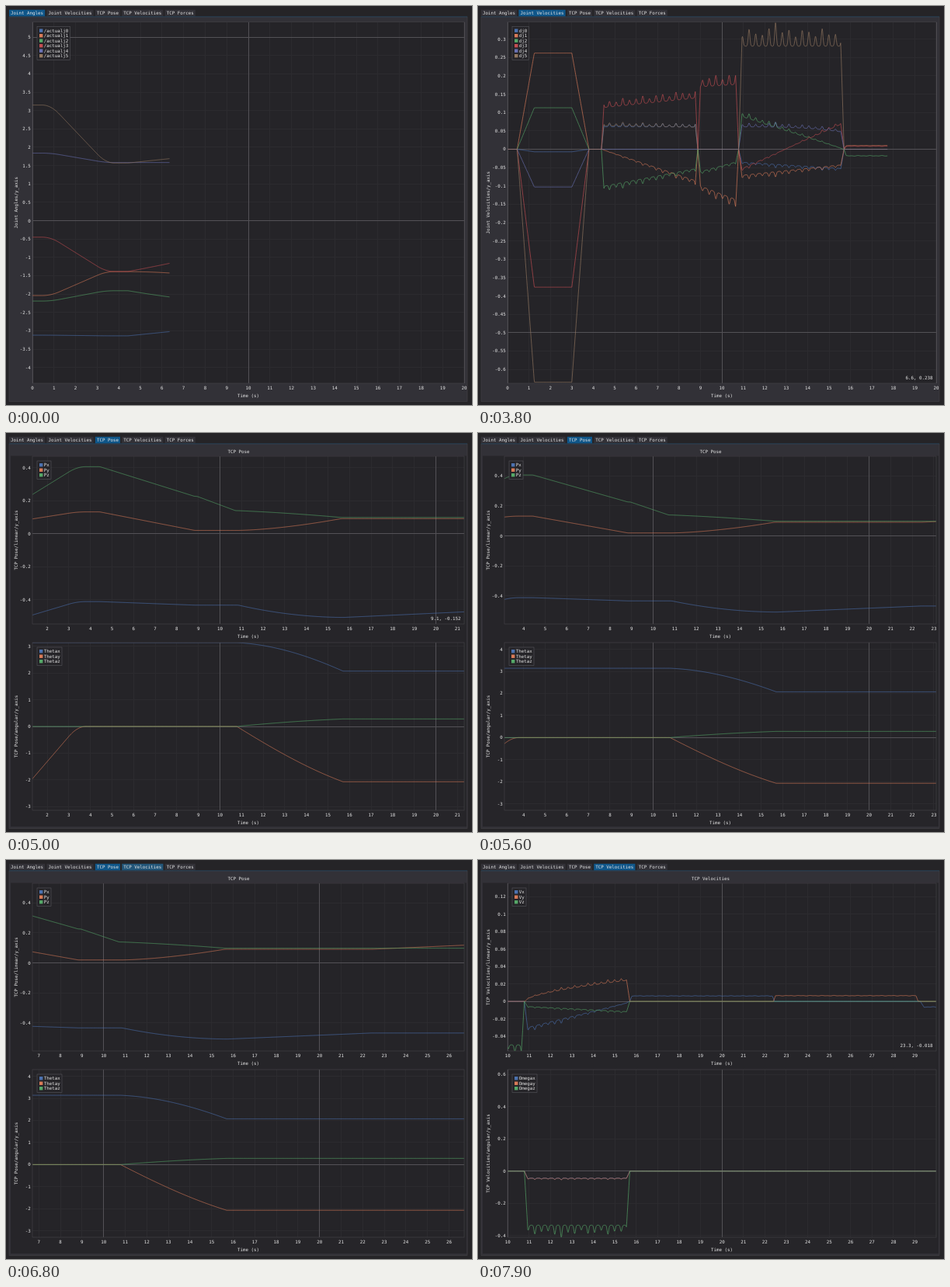
An HTML page for the animation above (8000 ms loop, 600 px wide and 514 px high).

```html
<!DOCTYPE html>
<html lang="en">
<head>
<meta charset="utf-8">
<title>Robot telemetry</title>
<style>
  html, body { margin: 0; width: 100%; height: 100%; overflow: hidden; background: #252427; }
  svg { display: block; }
  text { font: 5.82px "DejaVu Sans Mono", monospace; fill: #e6e6e6; dominant-baseline: central; white-space: pre; }
  .mid { text-anchor: middle; }
  .end { text-anchor: end; }
  .grid { stroke: #2c2b2f; shape-rendering: crispEdges; }
  .major { stroke: #535156; }
  .line { fill: none; stroke-width: .65; stroke-linejoin: round; }
</style>
</head>
<body>
<svg id="stage" width="600" height="514" viewBox="0 0 600 514"></svg>
<script>
const LOOP = 8000, STEP = 100, SPAN = 20, RIGHT = 590, CHAR = 3.5, DT = 0.02, END = 31;
const COLORS = ['#4c72b0', '#d97b58', '#55a868', '#c44e52', '#6a72b3', '#937860'];
const TABS = ['Joint Angles', 'Joint Velocities', 'TCP Pose', 'TCP Velocities', 'TCP Forces'];
const stage = document.getElementById('stage');

const clamp = v => Math.min(1, Math.max(0, v));
const mix = (a, b, k) => a + (b - a) * k;

// The robot's moves: start, end and ramp time in seconds
const MOVES = [[.45, 3.8, .8], [4.38, 8.88, .11], [8.88, 10.78, .12], [10.78, 15.7, .15],
  [15.7, 22.45, .1], [22.4, 29.15, .1], [29.25, 40, .17]];
const SWING = MOVES[3];
const ramp = (s, [from, to, rise]) => clamp(Math.min(s - from, to - s) / rise);
const progress = (s, [from, to]) => clamp((s - from) / (to - from));

// Periodic load peaks at steady speed
function ripple(s) {
  const i = MOVES.findIndex(m => ramp(s, m) === 1);
  if (i < 1) return 0;
  if (i > 3) return 0.05 * Math.sin(s * 17) * Math.sin(s * 5.3);
  const k = Math.floor(s / 0.31), f = s / 0.31 - k;
  const jolt = Math.exp(-(((s - 12.5) / 0.05) ** 2));
  return (0.13 + 0.04 * Math.sin(k * 2.3)) * Math.exp(-(((f - 0.35) / 0.17) ** 2)) + 0.13 * jolt;
}

// One axis: a speed, or [first, last, bend], per move; the place is its integral
function axis(start, ...speeds) {
  const smooth = s => speeds.reduce((sum, v, i) => {
    const [a, b = a, bend = 1] = [v].flat();
    return sum + mix(a, b, progress(s, MOVES[i]) ** bend) * ramp(s, MOVES[i]);
  }, 0);
  const sums = [start];
  for (let n = 1; n * DT <= END; n++) sums[n] = sums[n - 1] + 0.975 * DT * smooth((n - 0.5) * DT);
  const place = s => {
    const n = Math.floor(s / DT);
    return mix(sums[n], sums[n + 1], s / DT - n);
  };
  return { place, speed: s => smooth(s) * (1 + ripple(s)) };
}

const joints = [
  axis(-3.12, -.007, .061, 0, [-.035, -.053]),
  axis(-2.04, .262, [0, -.088], [-.098, -.14], [-.072, -.042], .01, .01),
  axis(-2.19, .113, [-.102, -.052], [-.063, -.033], [.092, 0], -.018, -.018),
  axis(-.45, -.376, [.113, .14], [.17, .177], [-.057, .072], .008, .008),
  axis(1.84, -.103, 0, 0, [.061, .046, 3]),
  axis(3.15, -.635, [.064, .06], 0, .281)
];
const tool = [
  axis(-.511, .04, -.005, 0, [-.031, -.001], .0062, 0, -.0065),
  axis(.08, .021, -.0262, 0, [0, .0245, .6], 0, .0065),
  axis(.2, .083, -.042, -.05, [-.0058, -.012])
];

// The tool tilts by an eighth of a turn during the swing
const tilt = s => progress(s, SWING);
const length = s => mix(3.14, 2.93, tilt(s));
const approach = axis(-2.4, 2.4 / 2.55 / 0.975);
const rotation = [
  s => length(s) * Math.cos(tilt(s) * Math.PI / 4),
  s => approach.place(s) - length(s) * Math.sin(tilt(s) * Math.PI / 4),
  s => 0.28 * tilt(s) * (1.4 - 0.4 * tilt(s))
];
const angular = [-.043, -.044, -.335].map(v => axis(0, 0, 0, 0, v).speed);

const tall = { top: 20.5, bottom: 486 }, upper = { top: 30, bottom: 246 }, lower = { top: 270, bottom: 486 };
const plot = (area, label, names, fns, fit, zoom) => ({ ...area, label: label + '/y_axis', names, fns, fit, zoom });
const numbered = prefix => joints.map((_, i) => prefix + i);
const axes = prefix => ['x', 'y', 'z'].map(a => prefix + a);
const places = list => list.map(a => a.place), speeds = list => list.map(a => a.speed);

const views = [
  [plot(tall, TABS[0], numbered('/actualj'), places(joints), [-4.43, 5.415])],
  [plot(tall, TABS[1], numbered('dj'), speeds(joints), [-.638, .347], { at: 4000, around: .033 })],
  [plot(upper, 'TCP Pose/linear', axes('P'), places(tool), [-.511, .413], { at: 5000, around: -.15 }),
   plot(lower, 'TCP Pose/angular', axes('Theta'), rotation, [-3.14, 3.14], { at: 5300, around: -2.4 })],
  [plot(upper, 'TCP Velocities/linear', axes('V'), speeds(tool), [-.057, .1356]),
   plot(lower, 'TCP Velocities/angular', axes('Omega'), angular, [-.41, .63])]
];

const text = (x, y, str, cls = '', extra = '') => `<text x="${x}" y="${y}" class="${cls}" ${extra}>${str}</text>`;
const rect = (x, y, w, h, fill, extra = '') => `<rect x="${x}" y="${y}" width="${w}" height="${h}" fill="${fill}" ${extra}/>`;
const rule = (x1, y1, x2, y2, major) =>
  `<path class="grid${major ? ' major' : ''}" d="M${x1} ${y1}L${x2} ${y2}"/>`;

// Tick spacing: a round interval split into ten
function spacing(range, height) {
  const mag = 10 ** Math.floor(Math.log10(range));
  const nice = mag * [1, 2, 5, 10].find(n => range / mag <= n);
  return nice / (height > 300 ? 20 : 10);
}
function ticks(lo, hi, step) {
  const out = [];
  for (let i = Math.ceil(lo / step - 1e-6); i * step <= hi + 1e-6; i++) {
    out.push({ v: i * step, name: String(+(i * step).toFixed(3)), major: i % 10 === 0 });
  }
  return out;
}

function pointer(t) {
  const glide = (a, b, from, to) => from.map((v, i) => mix(v, to[i], clamp((t - a) / (b - a))));
  if (t >= 3800 && t < 4500) return glide(3800, 4000, [220, 72], [200, 169]);
  if (t >= 4900 && t < 5200) return [250, 162];
  if (t >= 5200 && t < 5500) return [250, 460];
  return t >= 7700 ? glide(7600, 7900, [300, 100], [405, 202]) : null;
}

// Two wheel clicks widen the value axis around the pointer
function limits({ fit, zoom }, t) {
  if (!zoom || t < zoom.at) return fit;
  const scale = 1.1 ** (t < zoom.at + 100 ? 1 : 2);
  return fit.map(v => mix(zoom.around, v, scale));
}

function drawPlot(p, left, lo, hi, yTicks, now, mouse) {
  const { top, bottom } = p, w = RIGHT - left, h = bottom - top;
  const t0 = Math.max(0, now - SPAN);
  const px = s => left + (s - t0) / SPAN * w;
  const py = v => bottom - (v - lo) / (hi - lo) * h;
  let out = rect(left, top, w, h, '#252428');

  const xTicks = ticks(t0, t0 + SPAN, 1);
  for (const major of [false, true]) {
    for (const k of xTicks) if (k.major === major) out += rule(px(k.v), top, px(k.v), bottom, major);
    for (const k of yTicks) if (k.major === major) out += rule(left, py(k.v), RIGHT, py(k.v), major);
  }
  for (const k of xTicks) out += text(px(k.v), bottom + 6.3, k.name, 'mid');
  for (const k of yTicks) out += text(left - 2.2, py(k.v), k.name, 'end');

  const first = Math.max(0, Math.floor(t0 / DT) - 1), last = Math.floor(now / DT);
  out += `<svg x="${left}" y="${top}" width="${w}" height="${h}" viewBox="${left} ${top} ${w} ${h}">`;
  p.fns.forEach((fn, i) => {
    const at = s => px(s).toFixed(2) + ' ' + py(fn(s)).toFixed(2);
    let d = '';
    for (let n = first; n <= last; n++) d += (d ? 'L' : 'M') + at(n * DT);
    out += `<path class="line" stroke="${COLORS[i]}" d="${d}L${at(now)}"/>`;
  });
  out += '</svg>';
  out += rect(left, top, w, h, 'none', 'stroke="#454449" stroke-width=".6"');

  const lx = left + 6, ly = top + 6, rows = p.names.length;
  const longest = Math.max(...p.names.map(n => n.length));
  out += rect(lx, ly, 11 + longest * CHAR, rows * 6.5 + 4, '#252428', 'fill-opacity=".9" stroke="#56555a" stroke-width=".6"');
  p.names.forEach((n, i) => {
    const y = ly + 5.2 + i * 6.5;
    out += rect(lx + 3, y - 2.2, 4.4, 4.4, COLORS[i]) + text(lx + 8.7, y, n);
  });

  const cy = (top + bottom) / 2;
  out += text((left + RIGHT) / 2, bottom + 15.5, 'Time (s)', 'mid');
  out += text(12.5, cy, p.label, 'mid', `transform="rotate(-90 12.5 ${cy})"`);
  if (mouse && mouse[1] > top && mouse[1] < bottom) {
    const s = t0 + (mouse[0] - left) / w * SPAN, v = lo + (bottom - mouse[1]) / h * (hi - lo);
    out += text(585.5, bottom - 7.5, `${s.toFixed(1)}, ${v.toFixed(hi - lo > 3 ? 2 : 3)}`, 'end');
  }
  return out;
}

function drawTabs(active, hover) {
  let x = 4;
  return TABS.map((name, i) => {
    const fill = i === active ? '#0f5689' : i === hover ? '#225578' : '#323137';
    const tab = rect(x, 4.8, name.length * CHAR + 4.2, 8.6, fill) + text(x + 2.1, 9.2, name);
    x += name.length * CHAR + 6.4;
    return tab;
  }).join('');
}

function draw(t) {
  const now = 6.35 + t * 0.002993;
  const active = t < 3700 ? 0 : t < 4800 ? 1 : t < 7600 ? 2 : 3;
  const hover = t >= 4600 && t < 4800 ? 2 : t >= 6000 && t < 7600 ? 3 : active;
  const plots = views[active].map(p => {
    const [lo, hi] = limits(p, t);
    return { p, lo, hi, marks: ticks(lo, hi, spacing(hi - lo, p.bottom - p.top)) };
  });
  const widest = Math.max(4, ...plots.flatMap(q => q.marks.map(m => m.name.length)));
  const left = Math.round(20 + widest * CHAR), mouse = pointer(t);

  let out = rect(0, 0, 600, 514, '#252427') + drawTabs(active, hover);
  out += rect(4, 14, 590, 495.5, '#323137', 'stroke="#434247" stroke-width=".6"');
  out += rect(4, 13.6, 590, .6, '#1b4666');
  if (plots.length > 1) {
    out += rect(6, 29.5, 587, 477.5, '#262529') + text(299.5, 24, TABS[active], 'mid');
  }
  for (const q of plots) out += drawPlot(q.p, left, q.lo, q.hi, q.marks, now, mouse);
  stage.innerHTML = out;
}

let shown = -1;
const begin = performance.now();
function tick() {
  const t = Math.floor((performance.now() - begin) % LOOP / STEP) * STEP;
  if (t !== shown) draw(shown = t);
  requestAnimationFrame(tick);
}
tick();
</script>
</body>
</html>
```
